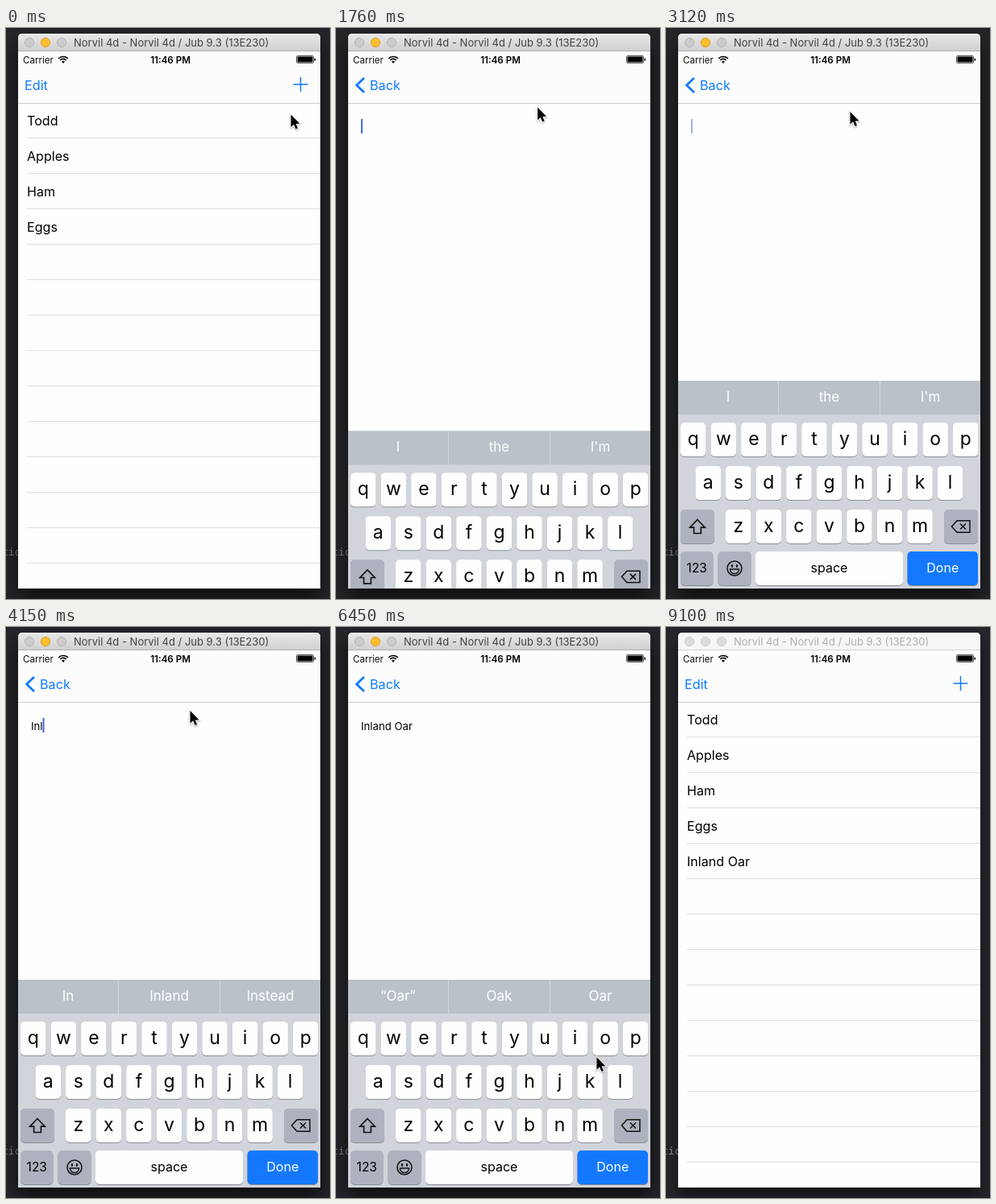
Write an HTML page with a canvas that moves like this. It is 402 px wide and 709 px high and loops after 9160 ms.

```html
<!DOCTYPE html>
<html lang="en">
<head>
<meta charset="utf-8">
<title>List app</title>
<style>
html, body { margin: 0; width: 100%; height: 100%; overflow: hidden; background: #232428; }
canvas { display: block; }
</style>
</head>
<body>
<canvas id="stage" width="402" height="709"></canvas>
<script>
const ctx = document.getElementById('stage').getContext('2d');
const LOOP = 9160;
const FONT = 'Inter, "Open Sans", sans-serif';
const BLUE = '#107afd';
const WIN = { x: 15, y: 7, w: 375, h: 689 };
const BOTTOM = 696, KEY_TOP = 438, KEY_H = 258;
const PUSH = 1022, KEYS_UP = 1611, POP = 7185, POP_SHOWN = 7450, BLUR = 9100;
const ITEMS = ['Todd', 'Apples', 'Ham', 'Eggs'];
const ENTRY = 'Inland Oar';
const TYPED = [3290, 3500, 4150, 4320, 4500, 4740, 4860, 5100, 5290, 5520];
const HINTS = [
  [0, 'I', 'the', "I'm"],
  [3290, '“I”', "I'm", "I'll"],
  [3500, '“In”', 'Inland', 'Instead'],
  [4150, '“Inl”', 'Inland', 'Instead'],
  [4320, '“Inla”', 'Inland', 'Instead'],
  [5100, '“O”', 'On', 'Our'],
  [5290, '“Oa”', 'Oak', 'Oar'],
  [5860, '“Oar”', 'Oak', 'Oar']
];
// time, x, y of the pointer tip
const POINTER = [
  [0, 353.5, 107.5], [179, 353.5, 107.5], [180, 353, 108], [340, 353, 108],
  [650, 363.5, 74.5], [1400, 363.5, 74.5], [1880, 229.5, 103], [1990, 229.5, 103],
  [2290, 228.5, 104], [5860, 228.5, 104], [6740, 355.5, 679.5], [7600, 355.5, 679.5],
  [8320, 331, 532], [8390, 331, 532], [8680, 297, 712]
];

const clamp = v => Math.max(0, Math.min(1, v));
const ramp = (t, a, b) => clamp((t - a) / (b - a));
const smooth = k => k * k * (3 - 2 * k);

// critically damped settle, 0 to 1
function spring(ms) {
  if (ms <= 0) return 0;
  const u = ms * 0.01826;
  return u > 11 ? 1 : 1 - (1 + u) * Math.exp(-u);
}

function rect(x, y, w, h, color) {
  ctx.fillStyle = color;
  ctx.fillRect(x, y, w, h);
}

function round(x, y, w, h, r, color) {
  ctx.fillStyle = color;
  ctx.beginPath();
  ctx.roundRect(x, y, w, h, r);
  ctx.fill();
}

function text(s, x, y, size, color, align = 'left', weight = 400) {
  ctx.font = `${weight} ${size}px ${FONT}`;
  ctx.textAlign = align;
  ctx.fillStyle = color;
  ctx.fillText(s, x, y);
}

function path(points, close) {
  ctx.beginPath();
  points.forEach(([x, y]) => ctx.lineTo(x, y));
  if (close) ctx.closePath();
}

function stroke(color, width) {
  ctx.strokeStyle = color;
  ctx.lineWidth = width;
  ctx.stroke();
}

function faded(alpha, draw) {
  if (alpha <= 0) return;
  ctx.save();
  ctx.globalAlpha *= Math.min(1, alpha);
  draw();
  ctx.restore();
}

function clipped(x, y, w, h, draw) {
  ctx.save();
  ctx.beginPath();
  ctx.rect(x, y, w, h);
  ctx.clip();
  draw();
  ctx.restore();
}

function backdrop(active) {
  rect(0, 0, 402, 709, '#25262a');
  ctx.font = '13px "DejaVu Sans Mono", monospace';
  ctx.textAlign = 'left';
  ctx.fillStyle = active ? '#8c8c8c' : '#999';
  ctx.fillText('tion', -5, 655);
  ctx.save();
  ctx.shadowColor = active ? 'rgba(0,0,0,.7)' : 'rgba(0,0,0,.5)';
  ctx.shadowBlur = active ? 26 : 20;
  ctx.shadowOffsetY = 12;
  round(WIN.x, WIN.y, WIN.w, WIN.h, [5, 5, 0, 0], '#fefefe');
  ctx.restore();
}

function titleBar(active) {
  let fill = '#f6f6f6';
  if (active) {
    fill = ctx.createLinearGradient(0, 7, 0, 28);
    fill.addColorStop(0, '#eae9ea');
    fill.addColorStop(1, '#d1d0d1');
  }
  round(15, 7, 375, 22, [5, 5, 0, 0], fill);
  rect(15, 28, 375, 1, active ? '#b2b1b2' : '#d3d3d3');
  [29, 49, 69].forEach((x, i) => {
    const lit = active && i === 1;
    ctx.beginPath();
    ctx.arc(x, 18, 5.6, 0, 7);
    ctx.fillStyle = lit ? '#fdbd2d' : active ? '#cdcccd' : '#dcdcdc';
    ctx.fill();
    stroke(lit ? '#dfa023' : active ? '#b5b4b5' : '#cacaca', 1);
  });
  text('Norvil 4d - Norvil 4d / Jub 9.3 (13E230)', 84, 23, 13, active ? '#424242' : '#afafaf');
}

function statusBar() {
  text('Carrier', 21, 43.5, 11.6, '#111');
  text('11:46 PM', 204, 43.5, 11.6, '#000', 'center', 600);
  ctx.lineCap = 'butt';
  [8, 5.1].forEach(r => {
    ctx.beginPath();
    ctx.arc(71, 43.5, r, -Math.PI * 0.76, -Math.PI * 0.24);
    stroke('#000', 1.7);
  });
  ctx.beginPath();
  ctx.moveTo(71, 44);
  ctx.arc(71, 43.5, 2.7, -Math.PI * 0.76, -Math.PI * 0.24);
  ctx.fillStyle = '#000';
  ctx.fill();
  ctx.beginPath();
  ctx.roundRect(360.5, 34.5, 21, 9, 1.5);
  stroke('#555', 1);
  round(361.5, 35.5, 19, 7, 1, '#000');
  round(382.5, 37.5, 1.6, 3.5, 1, '#222');
}

function navBar({ edit, plus, back, backX }) {
  rect(15, 29, 375, 64, '#fcfcfc');
  rect(15, 93, 375, 1, '#cecece');
  statusBar();
  faded(edit, () => text('Edit', 23, 77, 16.2, BLUE));
  faded(plus, () => {
    rect(356.5, 69.3, 18, 1.5, BLUE);
    rect(364.8, 61, 1.5, 18, BLUE);
  });
  faded(back, () => {
    path([[35, 62], [25.6, 71], [35, 80]]);
    stroke(BLUE, 2.8);
    text('Back', backX, 77, 16.2, BLUE);
  });
}

function listPage(x, items, dim) {
  rect(15, 94, 375, BOTTOM - 94, '#fefefe');
  for (let i = 0; i < 13; i++) {
    const y = 136 + i * 44;
    rect(x + 11, y, 364, 1, '#dfdfe1');
    if (items[i]) text(items[i], x + 11, y - 15.5, 16.1, '#000');
  }
  if (dim > 0) rect(15, 94, 375, BOTTOM - 94, `rgba(0,0,0,${dim})`);
}

function caretAlpha(t) {
  if (t < KEYS_UP) return 0;
  if (t < 3290) return 1 - ramp(t, 2540, 2720) + ramp(t, 3050, 3190);
  return 1 - ramp(t, 6130, 6270) + ramp(t, 6590, 6730);
}

function detailPage(x, t) {
  rect(x, 94, 375, BOTTOM - 94, '#fefefe');
  const s = ENTRY.slice(0, TYPED.filter(at => t >= at).length);
  text(s, x + 16, 127.5, 13.2, '#000');
  const end = x + 16 + ctx.measureText(s).width;
  faded(t < POP_SHOWN ? caretAlpha(t) : 0, () => rect(end, 113, 2, 18, '#4168d8'));
}

function hint(old, now, k, x, y) {
  const put = (s, a) => faded(a, () => text(s, x, y, 17, '#fff', 'center'));
  if (old === now || k >= 1) return put(now, 1);
  const bare = old.replace(/[“”]/g, '');
  put(bare.slice(0, Math.round(bare.length * (1 - k))), 1.2 * (1 - k));
  const grown = now[0] === '“' ? now : now.slice(0, Math.max(1, Math.round(now.length * k)));
  put(grown, 2 * k);
}

function hintBar(y, t) {
  rect(15, y, 375, 42, '#bac1c9');
  rect(139, y, 1, 42, '#d3d8dd');
  rect(265, y, 1, 42, '#d3d8dd');
  const n = HINTS.filter(h => t >= h[0]).length - 1;
  const now = HINTS[n], old = HINTS[Math.max(0, n - 1)];
  const k = n ? clamp((t - now[0]) / 300) : 1;
  [77, 202.5, 328].forEach((x, i) => hint(old[i + 1], now[i + 1], k, x, y + 25.5));
}

function key(x, y, w, color, label, size, ink = '#000') {
  round(x, y + 1, w, 42, 5, '#8b8e94');
  round(x, y, w, 42, 5, color);
  if (label) text(label, x + w / 2, y + (size > 20 ? 27.5 : 26), size, ink, 'center');
}

function keyRow(letters, x, y) {
  [...letters].forEach((c, i) => key(x + i * 37.55, y, 31.5, '#fefefe', c, 23));
}

function shiftIcon(x, y) {
  path([[0, -9], [9.3, 0.6], [4.4, 0.6], [4.4, 8], [-4.4, 8], [-4.4, 0.6], [-9.3, 0.6]]
    .map(([a, b]) => [x + a, y + b]), true);
  stroke('#111', 1.6);
}

function deleteIcon(x, y) {
  path([[-11.5, 0], [-5, -7.2], [11, -7.2], [11, 7.2], [-5, 7.2]].map(([a, b]) => [x + a, y + b]), true);
  stroke('#111', 1.5);
  [1, -1].forEach(d => {
    path([[x - 1, y - 3.5 * d], [x + 6, y + 3.5 * d]]);
    stroke('#111', 1.5);
  });
}

function smiley(x, y) {
  ctx.beginPath();
  ctx.arc(x, y, 9, 0, 7);
  stroke('#111', 1.5);
  ctx.fillStyle = '#111';
  [-3, 3].forEach(d => {
    ctx.beginPath();
    ctx.ellipse(x + d, y - 3, 1.2, 2, 0, 0, 7);
    ctx.fill();
  });
  ctx.beginPath();
  ctx.arc(x, y + 1, 5.6, 0, Math.PI);
  ctx.closePath();
  stroke('#111', 1.4);
}

function keyboard(y, t) {
  const grey = '#adb2be';
  rect(15, y, 375, KEY_H, '#d1d5db');
  hintBar(y, t);
  keyRow('qwertyuiop', 18, y + 52);
  keyRow('asdfghjkl', 36.5, y + 106);
  keyRow('zxcvbnm', 74, y + 160);
  key(18, y + 160, 42, grey);
  shiftIcon(39, y + 181.5);
  key(345, y + 160, 42, grey);
  deleteIcon(366, y + 181);
  key(18, y + 212, 40.5, grey, '123', 15.5);
  key(64.5, y + 212, 41, grey);
  smiley(85, y + 233);
  key(111, y + 212, 183, '#fefefe', 'space', 16);
  key(299.5, y + 212, 87.5, '#1478fe', 'Done', 16, '#fff');
  const press = t < 6860 ? 0 : 1 - ramp(t, 7030, 7210);
  faded(press, () => key(299.5, y + 212, 87.5, '#fefefe', 'Done', 16));
}

function pointer(t) {
  let i = POINTER.length - 1;
  while (i && t < POINTER[i][0]) i--;
  const a = POINTER[i], b = POINTER[i + 1] || a;
  const k = a === b ? 0 : smooth(ramp(t, a[0], b[0]));
  const x = a[1] + (b[1] - a[1]) * k, y = a[2] + (b[2] - a[2]) * k;
  if (y > 709) return;
  ctx.save();
  ctx.translate(x, y);
  path([[0, 0], [0, 15.6], [3.6, 12.3], [6, 18], [8.6, 16.9], [6.2, 11.4], [11, 11.2]], true);
  ctx.shadowColor = 'rgba(0,0,0,.35)';
  ctx.shadowBlur = 2;
  ctx.shadowOffsetY = 1;
  stroke('#fff', 2);
  ctx.shadowColor = 'transparent';
  ctx.fillStyle = '#000';
  ctx.fill();
  ctx.restore();
}

function scene(t) {
  const active = t < BLUR;
  const popped = t >= POP_SHOWN;
  const since = popped ? t - POP : t >= 1060 ? t - PUSH : 0;
  const move = spring(since);
  const depth = popped ? 1 - move : move;
  const fresh = clamp(since / 610), stale = 1 - clamp(since / 285);

  backdrop(active);
  titleBar(active);
  clipped(15, 29, 375, BOTTOM - 29, () => {
    listPage(15 - 112 * depth, popped ? [...ITEMS, ENTRY] : ITEMS, 0.1 * depth);
    if (depth > 0) detailPage(15 + 375 * (1 - depth), t);
    const tap = t >= 890 && !popped ? 0.2 : 1;
    navBar(popped
      ? { edit: fresh, plus: fresh, back: stale, backX: 42 + 126 * move }
      : { edit: stale, plus: stale * tap, back: fresh, backX: 42 + 95 * (1 - move) });
    const up = popped ? 1 - move : spring(t - KEYS_UP);
    if (up > 0) keyboard(BOTTOM - KEY_H * up, t);
  });
  pointer(t);
}

const start = performance.now();
function tick() {
  scene((performance.now() - start) % LOOP);
  requestAnimationFrame(tick);
}
tick();
</script>
</body>
</html>
```
